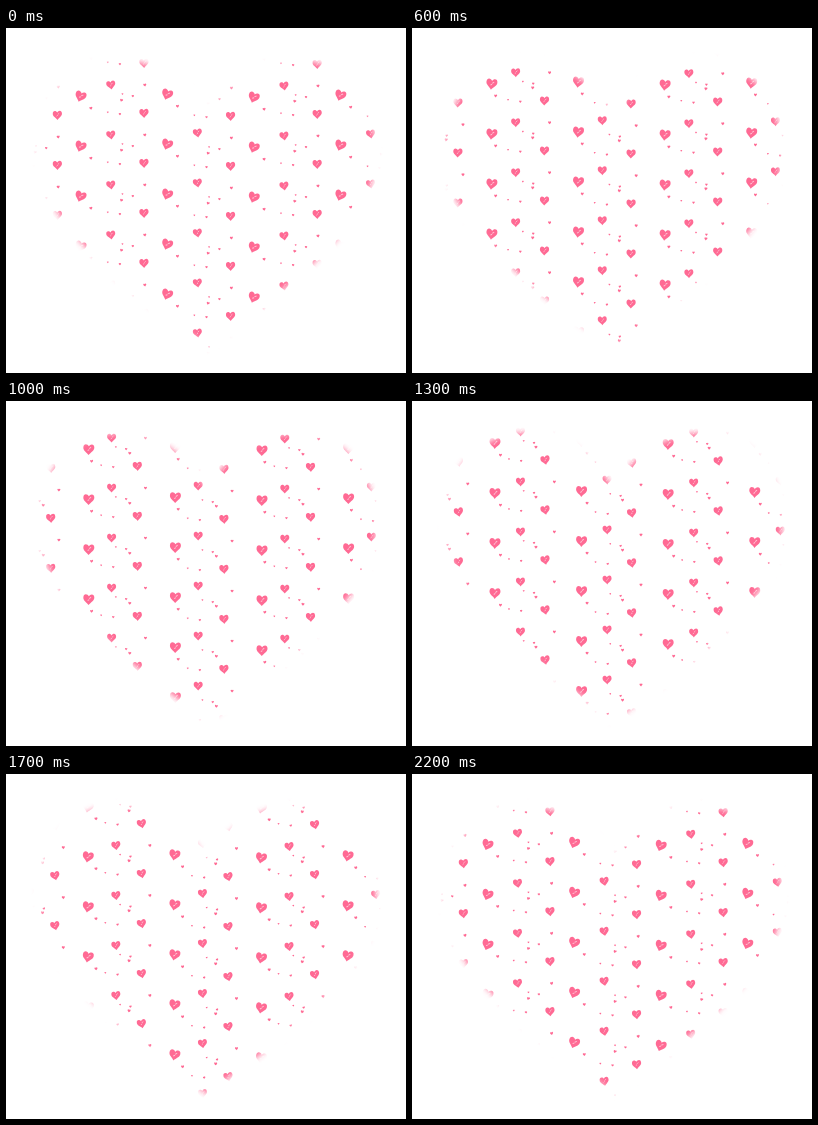
Animation, 400 px wide and 345 px high, one loop 2.3 s. Source, as an HTML page with a canvas:

```html
<!DOCTYPE html>
<html lang="en">
<head>
<meta charset="utf-8">
<title>Rising hearts</title>
<style>
  html, body { margin: 0; width: 100%; height: 100%; overflow: hidden; background: #fff; }
  canvas { display: block; }
</style>
</head>
<body>
<canvas id="stage" width="400" height="345"></canvas>
<script>
const W = 400, H = 345, LOOP = 2300, STEP = 100;
const COL = 86.6, ROW = 50;
const ctx = document.getElementById('stage').getContext('2d');

// Cosine of a loop fraction, highest at the given phase.
const wave = (u, phase, cycles = 1) => Math.cos(2 * Math.PI * cycles * (u - phase));

// Each layer sways as one: a large heart and the small ones that travel with it.
const layers = [
  {
    sway: u => 4.4 * wave(u, .545) - 1.1 * wave(u, .545, 2),
    tilt: u => 10 + 9 * wave(u, .97),
    hearts: [
      { x: 79.6, y: 68.5, size: 11 },
      { x: 34, y: 74.2, size: 3 }
    ]
  },
  {
    sway: u => 3.3 * wave(u, .7) + .5 * wave(u, .7, 2),
    tilt: u => -5 - 5 * wave(u, .9),
    hearts: [
      { x: 106.4, y: 57, size: 9 },
      { x: 53.7, y: 59, size: 3 },
      { x: 86.4, y: 80.2, size: 3 }
    ]
  },
  {
    sway: u => -3.3 * wave(u, .42) - .6 * wave(u, .31, 2),
    tilt: u => -5 + 8 * wave(u, .2),
    hearts: [
      { x: 48.1, y: 87.2, size: 9.2 },
      { x: 36.9, y: 70, size: 2.4 },
      { x: 24, y: 88, size: 2.4 },
      { x: 11.8, y: 86.2, size: 1.8 },
      { x: 26.5, y: 68, size: 1.8 }
    ]
  }
];

const heart = new Path2D('M0-.3C-.1-.52-.5-.6-.5-.17C-.5.12-.18.24 0 .5C.18.24.5.12.5-.17C.5-.6.1-.52 0-.3Z');
const fleck = new Path2D('M.04-.08L.2-.22M-.1.1L.04 0');

function drawHeart(x, y, size, tilt) {
  ctx.save();
  ctx.translate(x, y);
  ctx.rotate(tilt * Math.PI / 180);
  ctx.scale(size, size);
  ctx.fillStyle = '#ff6a94';
  ctx.fill(heart);
  if (size > 5) {
    ctx.strokeStyle = '#ffc4d4';
    ctx.lineWidth = .09;
    ctx.stroke(fleck);
  }
  ctx.restore();
}

// Soft-edged outline that holds the whole pattern.
function makeMask() {
  const mask = document.createElement('canvas');
  mask.width = W;
  mask.height = H;
  const half = new Path2D('M201 88C185 56 150 32 114 32C66 31 33 72 33 124C33 172 65 205 103 242C137 274 177 300 201 320H203V88Z');
  const whole = document.createElement('canvas');
  whole.width = W;
  whole.height = H;
  const shape = whole.getContext('2d');
  shape.fill(half);
  shape.setTransform(-1, 0, 0, 1, 403, 0);
  shape.fill(half);
  const soft = mask.getContext('2d');
  soft.filter = 'blur(3px)';
  soft.drawImage(whole, 0, 0);
  return mask;
}
const mask = makeMask();

function draw(u) {
  ctx.clearRect(0, 0, W, H);
  const rise = 1.1 * (1 - wave(u, .065)) - ROW * u;
  for (const { sway, tilt, hearts } of layers) {
    const dx = sway(u), angle = tilt(u);
    for (const { x, y, size } of hearts) {
      for (let c = -1; c < 5; c++) {
        const shift = Math.floor(c / 2) - (c % 2 ? 2 : 0);
        for (let r = -2; r < 7; r++) {
          drawHeart(x + dx + c * COL, y + rise + shift + r * ROW, size, angle);
        }
      }
    }
  }
  ctx.globalCompositeOperation = 'destination-in';
  ctx.drawImage(mask, 0, 0);
  ctx.globalCompositeOperation = 'source-over';
}

const start = performance.now();
function tick() {
  const t = (performance.now() - start) % LOOP;
  draw(Math.floor(t / STEP) * STEP / LOOP);
  requestAnimationFrame(tick);
}
tick();
</script>
</body>
</html>
```
